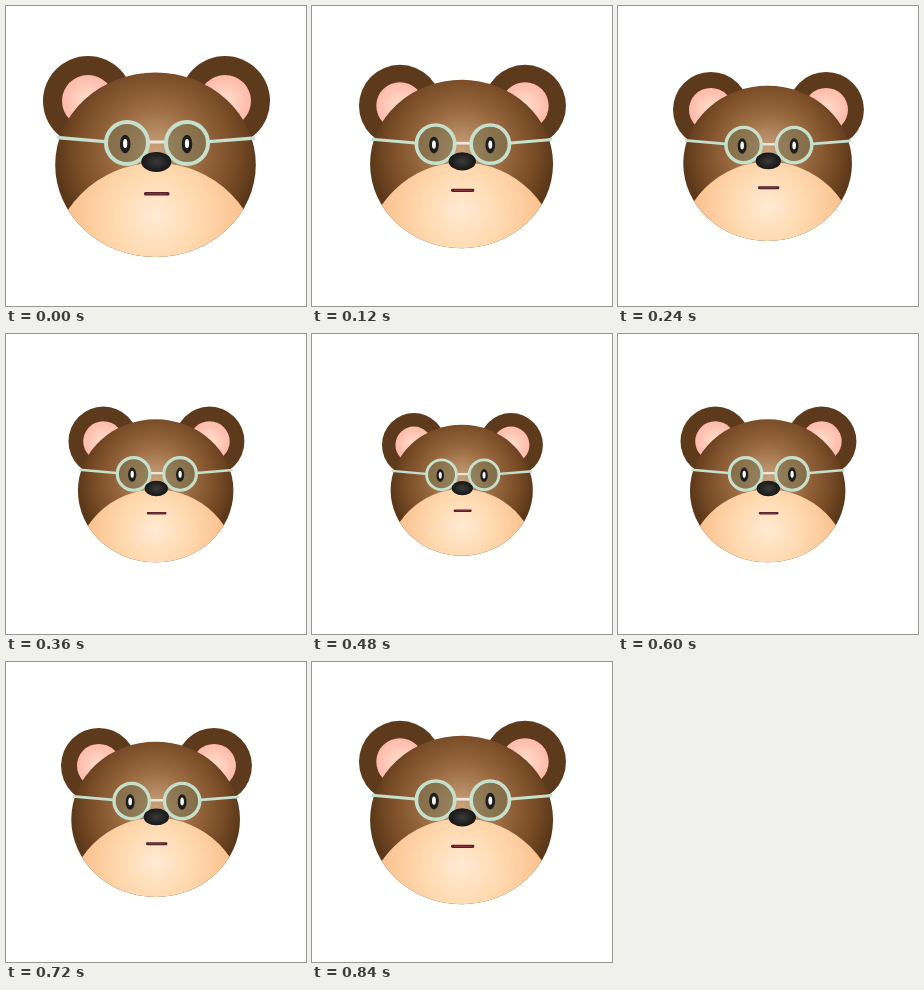
Write an HTML page that moves like this. It is 300 px wide and 300 px high and loops after 960 ms.

```html
<!DOCTYPE html>
<html lang="en">
<head>
<meta charset="utf-8">
<title>Pulsing bear</title>
<style>
  html, body { margin: 0; width: 100%; height: 100%; overflow: hidden; background: #fff; }
  svg { display: block; width: 100%; height: 100%; }
</style>
</head>
<body>
<svg viewBox="0 0 300 300">
  <defs>
    <radialGradient id="fur" gradientUnits="userSpaceOnUse" cx="150" cy="145" r="101">
      <stop offset="0" stop-color="#caa47e"/>
      <stop offset=".45" stop-color="#9a6a40"/>
      <stop offset=".8" stop-color="#774b26"/>
      <stop offset="1" stop-color="#5b3819"/>
    </radialGradient>
    <radialGradient id="cream" gradientUnits="userSpaceOnUse" cx="150" cy="210" r="92">
      <stop offset="0" stop-color="#ffebd3"/>
      <stop offset=".5" stop-color="#ffd8ae"/>
      <stop offset="1" stop-color="#f9bf8b"/>
    </radialGradient>
    <radialGradient id="pink">
      <stop offset="0" stop-color="#ffe0cb"/>
      <stop offset="1" stop-color="#ffb9aa"/>
    </radialGradient>
    <radialGradient id="snout">
      <stop offset="0" stop-color="#3a3a3a"/>
      <stop offset="1" stop-color="#161616"/>
    </radialGradient>
    <clipPath id="head"><ellipse cx="149.5" cy="158.8" rx="100.3" ry="92.3"/></clipPath>
    <g id="ear">
      <circle cx="82" cy="95" r="45" fill="#5d3a1b"/>
      <circle cx="82" cy="95" r="26" fill="url(#pink)"/>
    </g>
    <circle id="lens" r="21" fill="#7a7450" fill-opacity=".6" stroke="#c6e0ce" stroke-width="4"/>
    <g id="pupil">
      <ellipse rx="5.3" ry="9.2" fill="#1e1e1e"/>
      <ellipse cy="-.5" rx="2.1" ry="4.6" fill="#fff"/>
    </g>
  </defs>
  <g id="bear">
    <use href="#ear"/>
    <use href="#ear" transform="matrix(-1 0 0 1 301 0)"/>
    <g clip-path="url(#head)">
      <rect x="45" y="60" width="210" height="195" fill="url(#fur)"/>
      <circle cx="150" cy="263" r="106" fill="url(#cream)"/>
    </g>
    <path d="M51 131.5 99 135.7M203 135.7 249 132" stroke="#c6e0ce" stroke-width="3.3"/>
    <path d="M143 136H159" stroke="#ece6da" stroke-width="3"/>
    <use href="#lens" x="121" y="137"/>
    <use href="#lens" x="181" y="137"/>
    <use href="#pupil" x="119.2" y="138"/>
    <use href="#pupil" x="181" y="138"/>
    <ellipse cx="150.3" cy="155.9" rx="15" ry="10" fill="url(#snout)"/>
    <rect x="138" y="186" width="25.5" height="3.4" rx="1.5" fill="#54202a"/>
    <path d="M141 187.7H161" stroke="#8a3340" stroke-width="1.2"/>
  </g>
</svg>
<script>
  const STEP = 120, COUNT = 8;
  const sizes = [1, .912, .841, .775, .709];
  const bear = document.getElementById('bear');

  function draw(time) {
    const step = Math.floor(time / STEP) % COUNT;
    const size = sizes[Math.min(step, COUNT - step)];
    bear.setAttribute('transform', `translate(150.3 150) scale(${size}) translate(-150.3 -150)`);
  }

  const start = performance.now();
  function tick() {
    draw(performance.now() - start);
    requestAnimationFrame(tick);
  }
  tick();
</script>
</body>
</html>
```
